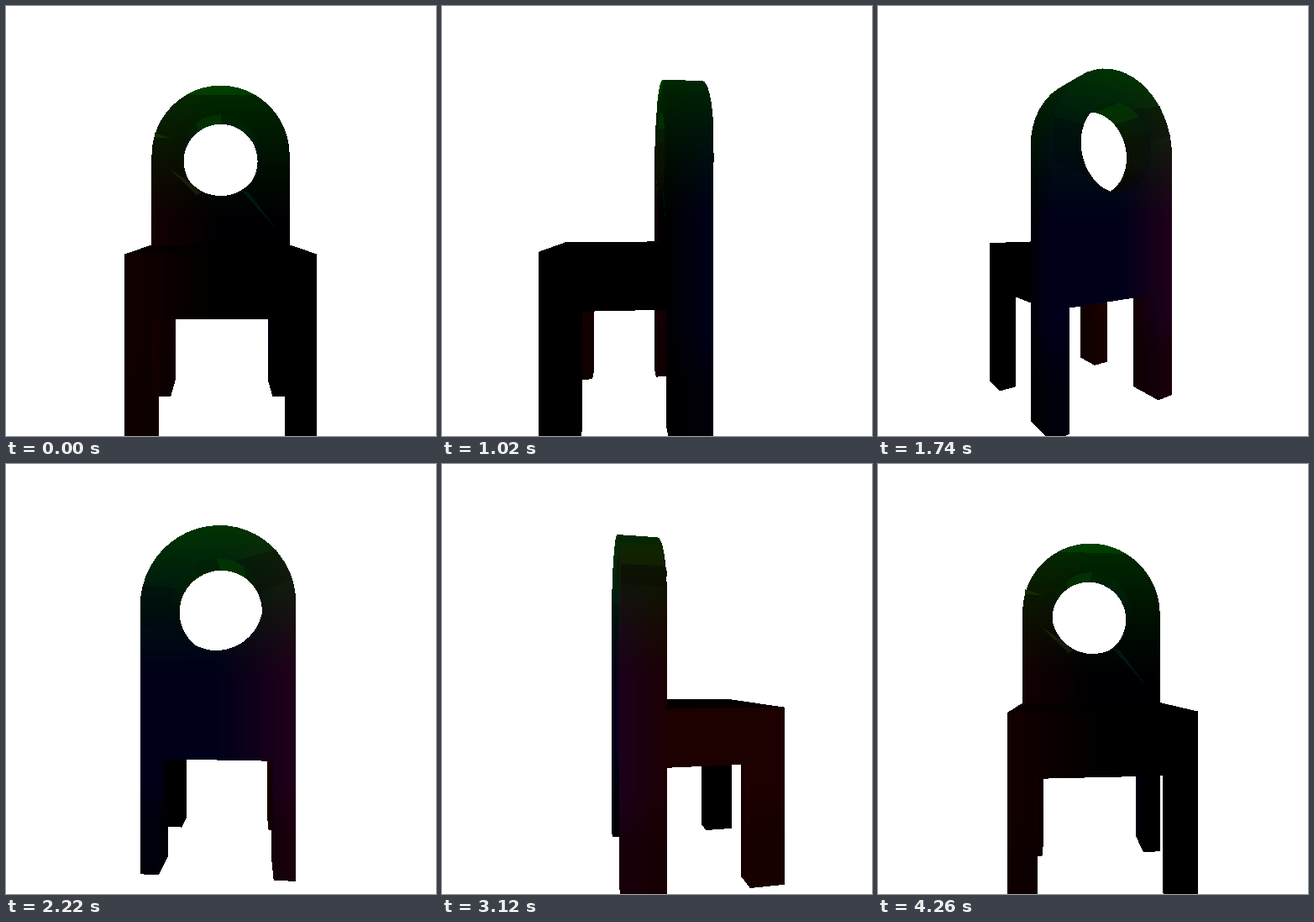
Animation of 512x512 px, one loop 4.32 s. Source, as an HTML page with a canvas:

```html
<!DOCTYPE html>
<html lang="en">
<head>
<meta charset="utf-8">
<title>Turning chair</title>
<style>
html, body { margin: 0; width: 100%; height: 100%; overflow: hidden; background: #fff; }
canvas { display: block; width: 512px; height: 512px; }
</style>
</head>
<body>
<canvas id="stage" width="512" height="512"></canvas>
<script>
const SIZE = 512, STEPS = 72, STEP_MS = 60;
const FOCAL = 443.4, CAMERA = 5.292, CX = 255.6, CY = 256.5;

// Chair dimensions; half the seat width is 1
const FRONT = 1.414, LEG_BACK = 0.963, PANEL = -0.053, BACK = -0.583, PANEL_W = 0.99;
const SEAT_TOP = -0.34, SEAT_LOW = -1.02, FLOOR = -2.508, LEG_LEFT = -0.715, LEG_RIGHT = 0.745;
const ARCH_Y = 0.95, HOLE = 0.583, ARCS = 48;

const NONE = [0, 0, 0];
const TINT = {
  front: [0.75, 0.8, 0.8],
  back: [1.3, 0.95, 1],
  side: [1.1, 0.8, 1],
  flat: [0.35, 1, 0.5]
};
const faces = [];

function face(points, mul, add = NONE) {
  faces.push({ points, mul, add });
}

function box(x0, x1, y0, y1, z0, z1) {
  const wall = z => [[x0, y0, z], [x1, y0, z], [x1, y1, z], [x0, y1, z]];
  face(wall(z0), TINT.back);
  face(wall(z1), TINT.front);
  for (const x of [x0, x1])
    face([[x, y0, z0], [x, y0, z1], [x, y1, z1], [x, y1, z0]], TINT.side);
  for (const y of [y0, y1])
    face([[x0, y, z0], [x1, y, z0], [x1, y, z1], [x0, y, z1]], TINT.flat);
}

function inner(i) {
  const a = i * 2 * Math.PI / ARCS;
  return [HOLE * Math.cos(a), ARCH_Y + HOLE * Math.sin(a)];
}

// Round above the arch centre, square below it
function outer(i) {
  const a = i * 2 * Math.PI / ARCS, c = Math.cos(a), s = Math.sin(a);
  const k = i % ARCS <= ARCS / 2 ? 1 : 1 / Math.max(Math.abs(c), Math.abs(s));
  return [c * k * PANEL_W, ARCH_Y + s * k];
}

// Points of a contour from one index to another, both included
function arc(contour, from, to) {
  const step = Math.sign(to - from);
  return Array.from({ length: Math.abs(to - from) + 1 }, (_, i) => contour(from + i * step));
}

function tubeTint(i) {
  if (i >= 12 && i < 17) return [1, 1.25, 0.7];
  if (i >= 3 && i < 8) return [1, 0.95, 1.3];
  return Math.floor(i / 4) % 2 ? [1, 0.7, 0.9] : [1, 0.85, 1];
}

function rimTint(i) {
  if (i >= 21 && i < 23) return [0.9, 0.6, 0.5];
  return i >= 18 && i < 21 ? [1.6, 0.9, 0.4] : [0.9, 0.8, 0.9];
}

function decal(points, z, mul, add) {
  face(points.map(p => [...p, z]), mul, add);
}

function build() {
  box(-1, 1, SEAT_LOW, SEAT_TOP, PANEL, FRONT);
  box(-PANEL_W, PANEL_W, SEAT_LOW, ARCH_Y - 1, BACK, PANEL);
  for (const [w, z0, z1] of [[PANEL_W, BACK, PANEL], [1, LEG_BACK, FRONT]]) {
    box(-w, LEG_LEFT, FLOOR, SEAT_LOW, z0, z1);
    box(LEG_RIGHT, w, FLOOR, SEAT_LOW, z0, z1);
  }
  for (let i = 0; i < ARCS; i++) {
    const a = inner(i), b = inner(i + 1), c = outer(i + 1), d = outer(i);
    const round = i < ARCS / 2, upright = Math.abs(c[0] - d[0]) < 1e-6;
    face([a, b, c, d].map(p => [...p, PANEL]), TINT.front);
    face([a, b, c, d].map(p => [...p, BACK]), TINT.back);
    face([[...a, BACK], [...b, BACK], [...b, PANEL], [...a, PANEL]], tubeTint(i));
    if (round || upright)
      face([[...d, BACK], [...c, BACK], [...c, PANEL], [...d, PANEL]], round ? rimTint(i) : TINT.side);
  }

  const near = PANEL + 0.004, far = BACK - 0.004;
  decal(arc(outer, 8, 16), near, [0.8, 1.2, 1]);
  decal([[-0.95, 1.27], [-0.73, 1.2], [-0.95, 1.2]], near, TINT.front, [6, 22, 0]);
  decal([[-0.71, 0.73], [-0.53, 0.62], [-0.28, 0.41], [-0.35, 0.38]], near, TINT.front, [18, 18, 11]);
  decal([[0.3, 0.44], [0.4, 0.42], [0.8, -0.11]], near, TINT.front, [0, 18, 20]);
  decal([[-0.95, 1.24], ...arc(inner, 22, 15), [-0.74, 1.62]], far, [1.3, 0.72, 0.9]);
  decal([[0.98, 0.7], [0.95, 1.2], ...arc(inner, 3, -7)], far, [1, 0.7, 0.9]);
}

const canvas = document.getElementById("stage");
const ctx = canvas.getContext("2d");
const image = ctx.createImageData(SIZE, SIZE);
const depth = new Float32Array(SIZE * SIZE);
const clamp = v => Math.max(0, Math.min(1, v));

// Red grows to the left, green upwards, blue to the rear
function paint(at, x, y, z, { mul, add }) {
  const up = Math.max(0, y), leg = clamp((y + 1.9) / 0.6);
  const r = 26 * Math.max(0, -x) * (1 - 0.35 * up) * (0.8 + 0.2 * leg);
  const g = 54 * Math.pow(up / 1.95, 1.25);
  const b = 26 * Math.max(0, z / BACK) * Math.max(0.1, 1 - 0.45 * up) * (0.4 + 0.6 * leg);
  image.data[at] = r * mul[0] + add[0];
  image.data[at + 1] = g * mul[1] + add[1];
  image.data[at + 2] = b * mul[2] + add[2];
}

function triangle(a, b, c, style) {
  const area = (b.x - a.x) * (c.y - a.y) - (b.y - a.y) * (c.x - a.x);
  if (Math.abs(area) < 1e-6) return;
  const x0 = Math.max(0, Math.floor(Math.min(a.x, b.x, c.x)));
  const x1 = Math.min(SIZE - 1, Math.ceil(Math.max(a.x, b.x, c.x)));
  const y0 = Math.max(0, Math.floor(Math.min(a.y, b.y, c.y)));
  const y1 = Math.min(SIZE - 1, Math.ceil(Math.max(a.y, b.y, c.y)));
  for (let y = y0; y <= y1; y++) {
    for (let x = x0; x <= x1; x++) {
      const px = x + 0.5, py = y + 0.5;
      let u = ((b.x - px) * (c.y - py) - (b.y - py) * (c.x - px)) / area;
      let v = ((c.x - px) * (a.y - py) - (c.y - py) * (a.x - px)) / area;
      let t = 1 - u - v;
      if (u < -1e-7 || v < -1e-7 || t < -1e-7) continue;
      u *= a.w; v *= b.w; t *= c.w;
      const w = u + v + t, i = y * SIZE + x;
      if (w <= depth[i]) continue;
      depth[i] = w;
      const mix = k => (u * a.p[k] + v * b.p[k] + t * c.p[k]) / w;
      paint(i * 4, mix(0), mix(1), mix(2), style);
    }
  }
}

function render(step) {
  const angle = step * 2 * Math.PI / STEPS, cos = Math.cos(angle), sin = Math.sin(angle);
  const project = p => {
    const w = 1 / (CAMERA - p[0] * sin - p[2] * cos);
    return { p, w, x: CX + FOCAL * w * (p[0] * cos - p[2] * sin), y: CY - FOCAL * w * p[1] };
  };
  image.data.fill(255);
  depth.fill(0);
  for (const f of faces) {
    const q = f.points.map(project);
    for (let i = 2; i < q.length; i++) triangle(q[0], q[i - 1], q[i], f);
  }
  ctx.putImageData(image, 0, 0);
}

build();
let shown = -1;
const start = performance.now();
function tick() {
  const step = Math.floor((performance.now() - start) / STEP_MS) % STEPS;
  if (step !== shown) render(shown = step);
  requestAnimationFrame(tick);
}
tick();
</script>
</body>
</html>
```
